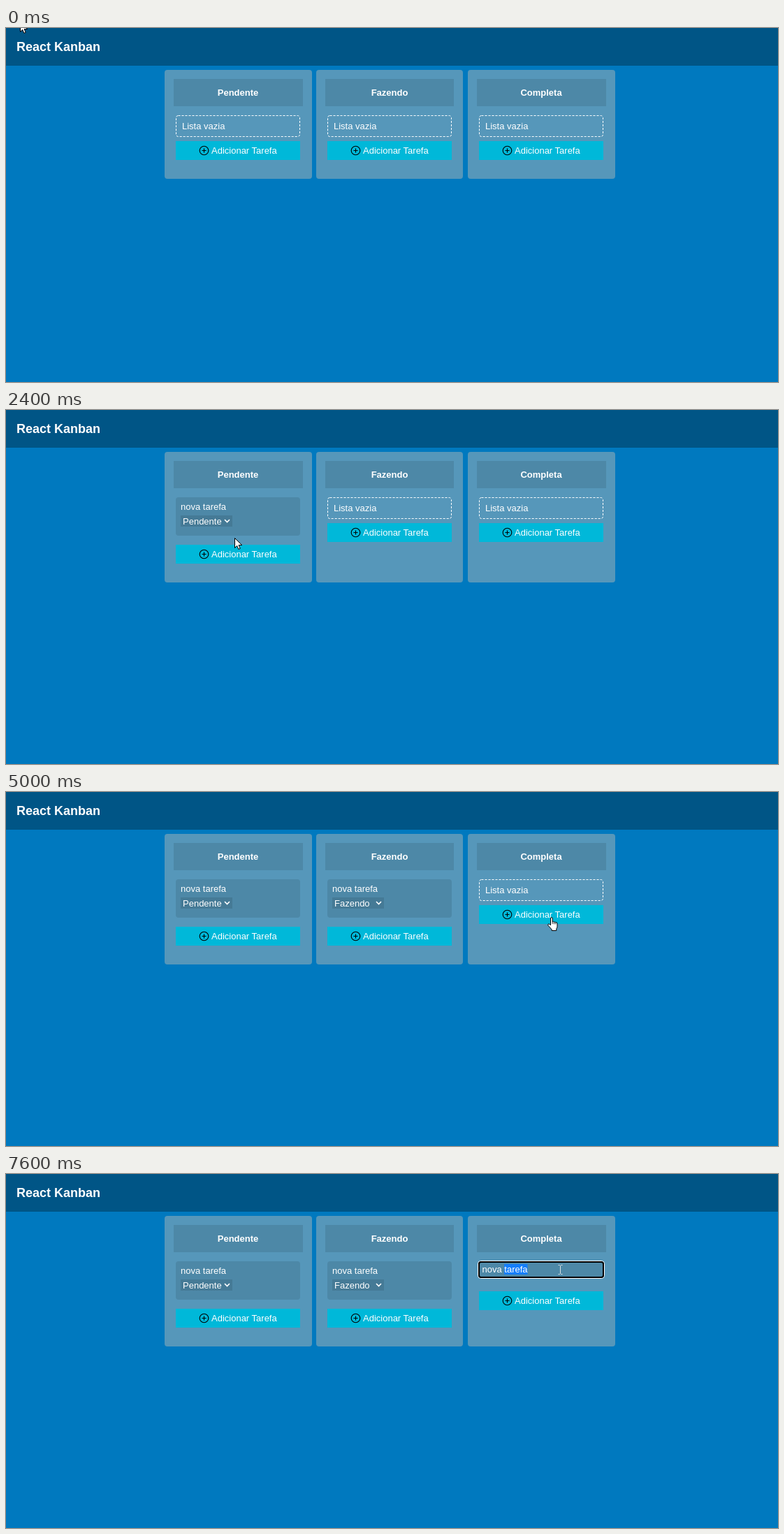
These frames come from a looping animation (1105 px wide and 507 px high, 8000 ms). An HTML page:

```html
<!DOCTYPE html>
<html lang="pt">
<head>
<meta charset="utf-8">
<title>React Kanban</title>
<style>
html, body { margin: 0; width: 100%; height: 100%; overflow: hidden; background: #0079bf; }
svg { display: block; width: 1105px; height: 507px; }
text { font: 13px "Liberation Sans", Arial, sans-serif; fill: #fff; white-space: pre; }
.bold { font-weight: 700; }
.mid { text-anchor: middle; }
.column { fill: #5697ba; }
.panel { fill: #4d88a7; }
.select { fill: #457a96; }
.button { fill: #00b8d9; }
.dashed { fill: none; stroke: #fff; stroke-dasharray: 3 2; }
.chevron { fill: none; stroke: #fff; stroke-width: 1.6; }
.icon { fill: none; stroke: #000; stroke-width: 1.1; }
.pointer { fill: #fff; stroke: #000; stroke-width: 1; stroke-linejoin: round; }
.beam { fill: none; stroke: #d8e0e4; stroke-width: 1; }
</style>
</head>
<body>
<svg id="stage" viewBox="0 0 1105 507"></svg>
<script>
const LOOP = 8000, TICK = 100, STEP = 217;
const NAMES = ['Pendente', 'Fazendo', 'Completa'];
const ADDED = [2300, 4000, 5200];
const EDIT = 6900, FOCUS = 7400, SELECT = 7600;

// start, end, destination, then optional curve handles
const START = [20, -9];
const MOVES = [
  [100, 1000, 320, 209, -72, 90, 160, 408],
  [1000, 1300, 326, 185],
  [1400, 1500, 327, 183],
  [2400, 3100, 553, 216, 335, 330, 510, 400],
  [3100, 3300, 553, 191],
  [3400, 3500, 554, 188],
  [4100, 4800, 781, 179, 570, 340, 800, 370],
  [4900, 5000, 780, 179],
  [5200, 5300, 703, 314],
  [5400, 5500, 662, 370],
  [5800, 6700, 744, 137, 730, 350, 870, 210],
  [6900, 7000, 794, 137]
];

const svg = document.getElementById('stage');

function add(parent, tag, attrs = {}, label) {
  const el = document.createElementNS('http://www.w3.org/2000/svg', tag);
  for (const key in attrs) el.setAttribute(key, attrs[key]);
  if (label) el.textContent = label;
  parent.appendChild(el);
  return el;
}

const rect = (parent, cls, x, y, width, height, rx = 0) =>
  add(parent, 'rect', { class: cls, x, y, width, height, rx });
const text = (parent, label, x, y, cls = '') => add(parent, 'text', { x, y, class: cls }, label);
const show = (el, on) => el.setAttribute('visibility', on ? 'inherit' : 'hidden');

function makeButton(parent) {
  const g = add(parent, 'g');
  rect(g, 'button', 16, 0, 178, 27);
  add(g, 'circle', { class: 'icon', cx: 56.5, cy: 13.5, r: 6.3 });
  add(g, 'path', { class: 'icon', d: 'M53.5 13.5h6M56.5 10.5v6' });
  text(g, 'Adicionar Tarefa', 67, 18);
  return g;
}

function makeColumn(name, i) {
  const g = add(svg, 'g', { transform: `translate(${227 + STEP * i} 0)` });
  const width = i === 1 ? 210 : 211;
  const back = rect(g, 'column', 0, 60, width, 156, 4);
  rect(g, 'panel', 13, 73, width - 26, 39);
  text(g, name, 105, 97, 'bold mid');

  const empty = add(g, 'g');
  rect(empty, 'dashed', 16.5, 125.5, 177, 30, 3);
  text(empty, 'Lista vazia', 25, 145);

  const card = add(g, 'g');
  rect(card, 'panel', 16, 125, 178, 55, 4);
  text(card, 'nova tarefa', 23, 143);
  rect(card, 'select', 23, 151, 74, 16);
  text(card, name, 26, 164);
  add(card, 'path', { class: 'chevron', d: 'M86 157l3.5 3.5 3.5-3.5' });

  return { back, empty, card, button: makeButton(g) };
}

function makeEditor() {
  const g = add(svg, 'g');
  rect(g, 'panel', 677, 125, 178, 24, 4);
  const ring = add(g, 'g', { fill: 'none' });
  add(ring, 'rect', { x: 675.5, y: 124.5, width: 181, height: 25, rx: 4, stroke: '#fff' });
  add(ring, 'rect', { x: 677, y: 126, width: 178, height: 22, rx: 3, stroke: '#000', 'stroke-width': 2 });
  const mark = add(g, 'rect', { x: 713, y: 129, width: 33.5, height: 15, fill: '#147efb' });
  text(g, 'nova tarefa', 681.5, 141);
  return { g, ring, mark };
}

function makePointer() {
  const g = add(svg, 'g');
  const arrow = add(g, 'path', {
    class: 'pointer', d: 'M.5 .5v14l3.2-3.1 2.1 5 2.4-1-2.1-4.9h4.6z'
  });
  const hand = add(g, 'g', { class: 'pointer', transform: 'translate(-5 0)' });
  add(hand, 'path', {
    d: 'M4.5 11.5V2a1.3 1.3 0 0 1 2.7 0v5q1.3-1 2.3 .3q1.4-.8 2.2 .5q2-.6 2.3 1.2v4.5' +
       'q0 2-1.2 3.4v2.6h-6.6v-1.6L1 12.2q-.9-2 .8-2.3q1.2 0 2.7 2z'
  });
  add(hand, 'path', { d: 'M7.2 7v3M9.5 7.3v3M11.7 7.8v2.6', 'stroke-width': .8 });
  const beam = add(g, 'path', {
    class: 'beam', d: 'M-3-6.5h2l1 1 1-1h2M0-5.5v11M-3 6.5h2l1-1 1 1h2'
  });
  return { g, arrow, hand, beam };
}

rect(svg, '', 0, 0, 1105, 54).setAttribute('fill', '#005586');
text(svg, 'React Kanban', 15, 33, 'bold').style.fontSize = '18px';
const columns = NAMES.map(makeColumn);
const editor = makeEditor();
const pointer = makePointer();

function pointerAt(t) {
  let p = START;
  for (const [t0, t1, x, y, ax, ay, bx, by] of MOVES) {
    if (t <= t0) break;
    const u = Math.min(1, (t - t0) / (t1 - t0)), v = 1 - u;
    const mix = (a, b, c, d) => b === undefined
      ? a * v + d * u
      : a * v * v * v + 3 * b * v * v * u + 3 * c * v * u * u + d * u * u * u;
    p = [mix(p[0], ax, bx, x), mix(p[1], ay, by, y)];
  }
  return p.map(Math.round);
}

function buttonTop(i, t) {
  if (t < ADDED[i]) return 162;
  return i === 2 && t >= EDIT ? 168 : 193;
}

// The shape reacts one tick after the layout under it changes.
function pointerShape(x, y, t) {
  const i = Math.floor((x - 227) / STEP);
  if (i < 0 || i > 2) return 'arrow';
  const left = x - 227 - STEP * i;
  if (left < 16 || left > 194) return 'arrow';
  const top = buttonTop(i, t - TICK);
  if (y >= top && y < top + 27) return 'hand';
  return t >= ADDED[i] && y > 128 && y < 147 ? 'beam' : 'arrow';
}

function draw(ms) {
  const t = Math.floor(ms / TICK) * TICK;
  const height = t < ADDED[0] ? 156 : 187;
  columns.forEach((c, i) => {
    const full = t >= ADDED[i];
    c.back.setAttribute('height', height);
    show(c.empty, !full);
    show(c.card, full && !(i === 2 && t >= EDIT));
    c.button.setAttribute('transform', `translate(0 ${buttonTop(i, t)})`);
  });
  show(editor.g, t >= EDIT);
  show(editor.ring, t >= FOCUS);
  show(editor.mark, t >= SELECT);
  if (t < EDIT) [editor.ring, editor.mark].forEach(el => show(el, false));

  const [x, y] = pointerAt(t);
  const shape = pointerShape(x, y, t);
  const shift = shape === 'beam' ? .5 : 0;
  pointer.g.setAttribute('transform', `translate(${x - shift} ${y})`);
  for (const key of ['arrow', 'hand', 'beam']) show(pointer[key], key === shape);
}

const begin = performance.now();
function loop() {
  draw((performance.now() - begin) % LOOP);
  requestAnimationFrame(loop);
}
loop();
</script>
</body>
</html>
```
